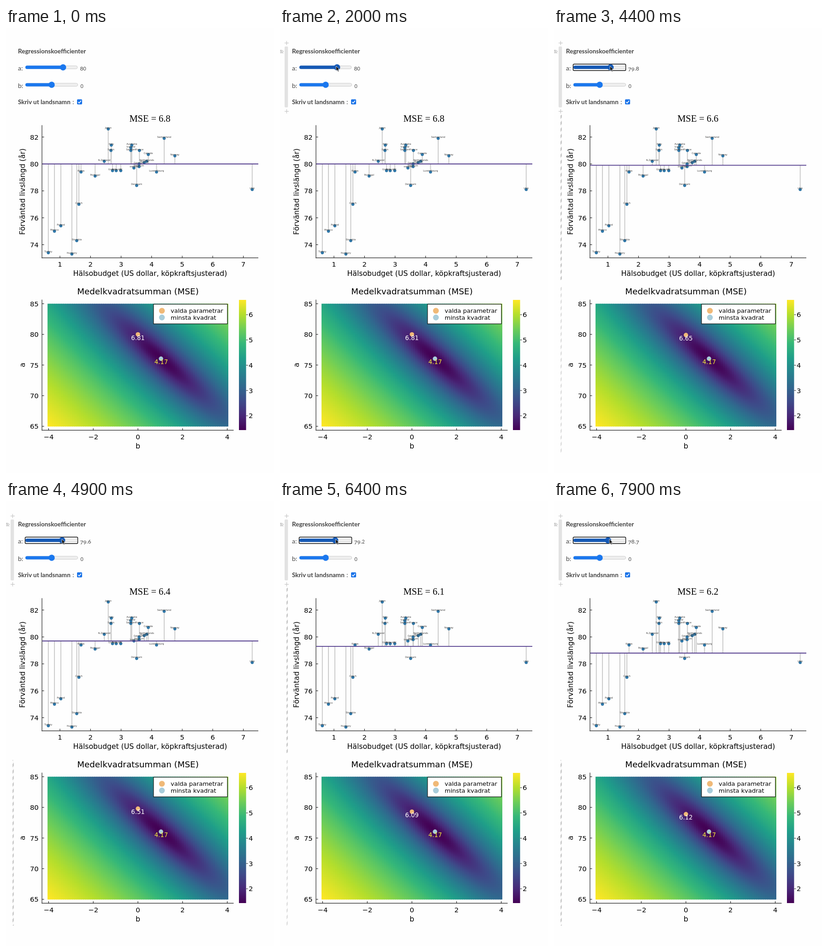
Recreate the animation shown at these times as an HTML page with a canvas. Size 581x964 px, loop 8 s.

```html
<!DOCTYPE html>
<html lang="sv">
<head>
<meta charset="utf-8">
<title>Regressionskoefficienter</title>
<style>
  html, body { margin: 0; width: 100%; height: 100%; overflow: hidden; background: #fefefe; }
  canvas, svg { position: absolute; left: 0; top: 0; width: 581px; height: 964px; }
  svg { font-family: "DejaVu Sans", sans-serif; }
  .ui { font: 14px Lato, sans-serif; fill: #444; }
  .bold { font-weight: 700; font-size: 13.5px; }
  .tex { font: 20.4px "Liberation Serif", serif; }
  .tick { font-size: 14.8px; }
  .axis { font-size: 15.68px; }
  .num { font-size: 13.2px; }
  .name { font-size: 5.2px; fill: #3a3a3a; }
  .stripe {
    position: absolute; left: 13.6px; width: 3.6px;
    background: repeating-linear-gradient(-45deg, #c8c8c8 0 4.95px, #fbfbfb 4.95px 9.9px);
    background-size: 3.6px 14px;
  }
</style>
</head>
<body>
<canvas id="map" width="581" height="964"></canvas>
<svg id="art" viewBox="0 0 581 964"></svg>
<div class="stripe" id="plotRun" style="top:188px;height:358px"></div>
<div class="stripe" id="mapRun" style="top:561px;height:359px"></div>
<script>
const $ = id => document.getElementById(id);
const LOOP = 8000, STEP = 100;

// country, health budget, life expectancy
const data = [
  ['Japan', 2.58, 82.6], ['Switzerland', 4.41, 81.9], ['Italy', 2.68, 81.4],
  ['Spain', 2.67, 81], ['Australia', 3.35, 81.4], ['Iceland', 3.32, 81.2],
  ['Sweden', 3.32, 81], ['France', 3.6, 81], ['Canada', 3.89, 80.7],
  ['Norway', 4.76, 80.6], ['N.Zealand', 2.45, 80.2], ['Netherlands', 3.84, 80.2],
  ['Austria', 3.76, 80.1], ['Germany', 3.59, 80], ['Belgium', 3.59, 79.8],
  ['Ireland', 3.42, 79.7], ['Greece', 2.72, 79.5], ['Finland', 2.84, 79.5],
  ['UK', 2.99, 79.5], ['Luxembourg', 4.16, 79.4], ['Korea', 1.69, 79.4],
  ['Portugal', 2.15, 79.1], ['Denmark', 3.51, 78.4], ['USA', 7.29, 78.1],
  ['Czech', 1.62, 77], ['Poland', 1.03, 75.4], ['Mexico', 0.82, 75],
  ['Slovakia', 1.55, 74.3], ['Turkey', 0.62, 73.4], ['Hungary', 1.39, 73.3]
];
const mse = (a, b = 0) =>
  data.reduce((sum, [, x, y]) => sum + (y - a - b * x) ** 2, 0) / data.length;

// plot coordinates
const px = x => 50.7 + 66.26 * x;
const py = y => 294.5 - 29.15 * (y - 80);
const bx = b => 286 + 48.4 * b;
const ay = a => 663.7 - 13.28 * (a - 80);
const cy = v => 621 - 54.75 * (v - 6);

// svg helpers
function el(tag, attrs, parent = $('art')) {
  const node = document.createElementNS('http://www.w3.org/2000/svg', tag);
  for (const key in attrs) node.setAttribute(key, attrs[key]);
  return parent.appendChild(node);
}
const set = (node, attrs) => { for (const key in attrs) node.setAttribute(key, attrs[key]); };
function text(str, x, y, cls, anchor = 'middle', more = {}, parent) {
  const node = el('text', { x, y, class: cls, 'text-anchor': anchor, ...more }, parent);
  node.textContent = str;
  return node;
}
const line = (x1, y1, x2, y2, stroke = '#222', width = 1.2, parent) =>
  el('line', { x1, y1, x2, y2, stroke, 'stroke-width': width }, parent);
const rect = (x, y, width, height, fill, more = {}, parent) =>
  el('rect', { x, y, width, height, fill, ...more }, parent);
const dot = (cx, cy, r, fill, more = {}) => el('circle', { cx, cy, r, fill, ...more });

// viridis colours
const stops = ['440154', '482878', '3e4a89', '31688e', '26828e', '1f9e89', '35b779', '6dcd59', 'b4de2c', 'fde725']
  .map(hex => [0, 2, 4].map(i => parseInt(hex.substr(i, 2), 16)));
function viridis(u) {
  const p = Math.max(0, Math.min(1, u)) * (stops.length - 1);
  const i = Math.min(stops.length - 2, Math.floor(p));
  return `rgb(${stops[i].map((c, j) => Math.round(c + (stops[i + 1][j] - c) * (p - i)))})`;
}

function paintMap() {
  const g = $('map').getContext('2d');
  const low = 1.43, high = Math.log(mse(65, -4));
  g.save();
  g.beginPath();
  g.rect(90, 597.3, 392, 266);
  g.clip();
  for (let r = 200; r >= 0; r--) {
    for (let c = 0; c <= 80; c++) {
      const a = 65 + r / 10, b = -4 + c / 10;
      g.fillStyle = viridis((Math.log(mse(a, b)) - low) / (high - low));
      g.fillRect(bx(b - 0.05), ay(a + 0.05), 6, 2.4);
    }
  }
  g.restore();
  for (let y = 589; y < 871; y++) {
    g.fillStyle = viridis((871 - y) / 282);
    g.fillRect(505, y, 15.5, 1);
  }
}

function slider(y, width) {
  rect(42.4, y - 3.3, width, 6.6, '#efefef', { rx: 3.3, stroke: '#c4c4c4', 'stroke-width': 0.8 });
  const fill = rect(42, y - 3.6, 57, 7.2, '#1a77ee', { rx: 3.6 });
  const thumb = dot(99, y, 6.7, '#1a77ee');
  return { fill, thumb };
}

// old-style figures: 0-2 are small, most others hang below the line
function figures(node, str) {
  node.textContent = '';
  let shift = 0;
  for (const ch of str) {
    const dy = '34579'.includes(ch) ? 2.4 : 0;
    el('tspan', { dy: dy - shift, 'font-size': '012'.includes(ch) ? 10.6 : 12.2 }, node).textContent = ch;
    shift = dy;
  }
}

paintMap();

// controls
text('Regressionskoefficienter', 26, 55, 'ui bold', 'start');
text('a:', 26, 92, 'ui', 'start');
text('b:', 26, 130, 'ui', 'start');
text('Skriv ut landsnamn', 26, 165, 'ui bold', 'start');
text(':', 144, 165, 'ui', 'start');
const focus = rect(41.5, 78.3, 114, 14, 'none', { rx: 2, stroke: '#111', 'stroke-width': 1.5 });
const sliderA = slider(85.2, 112.4);
slider(123, 113.2);
const valueA = text('', 160.5, 92, 'ui', 'start');
figures(text('', 161.5, 130, 'ui', 'start'), '0');
rect(154, 154.5, 11, 11, '#1a73e8', { rx: 1.8 });
el('path', { d: 'M156.3 160.2l2.3 2.4l4.3-5', fill: 'none', stroke: '#fff', 'stroke-width': 1.6 });

// marks of the hovered cell
const hover = el('g', {});
const bar = rect(10, 40, 7.3, 132, '#e2e2e2', { rx: 2 }, hover);
for (const y of [32.5, 180.5]) {
  line(10, y, 19, y, '#bdbdbd', 1, hover);
  line(14.5, y - 4.5, 14.5, y + 4.5, '#bdbdbd', 1, hover);
}
el('path', {
  d: 'M-3 51Q2.5 44.5 8 51Q2.5 57.5 -3 51M0.6 51a2 2 0 1 0 4 0a2 2 0 1 0 -4 0M-1 46.5L7 55.5',
  fill: 'none', stroke: '#bdbdbd', 'stroke-width': 1
}, hover);

// scatter plot
const title = text('', 312, 203, 'tex');
line(78, 210.5, 78, 498.4);
line(77.4, 497.8, 547, 497.8);
for (let x = 1; x <= 7; x++) {
  line(px(x), 493.5, px(x), 498);
  text(x, px(x), 516.8, 'tick');
}
for (let y = 74; y <= 82; y += 2) {
  line(78, py(y), 82.5, py(y));
  text(y, 70.8, py(y) + 5.4, 'tick', 'end');
}
text('Hälsobudget (US dollar, köpkraftsjusterad)', 312.5, 537, 'axis');
text('Förväntad livslängd (år)', 0, 0, 'axis', 'middle', { transform: 'translate(41 354.5) rotate(-90)' });
const rests = data.map(([, x, y]) => line(px(x), py(y), px(x), py(80), '#cccccc', 2));
data.forEach(([, x, y]) => dot(px(x), py(y), 3, '#2f7bb0', { stroke: '#23658f', 'stroke-width': 0.7 }));
data.forEach(([name, x, y]) => text(name, px(x), py(y) - 0.8, 'name'));
const fit = line(78.5, 294.5, 547, 294.5, '#523b8c', 1.9);

// map of the mean square
text('Medelkvadratsumman (MSE)', 286, 577.3, '', 'middle', { 'font-size': 18.3 });
line(78, 588.5, 78, 872);
line(77.4, 871.4, 493.5, 871.4);
for (let b = -4; b <= 4; b += 2) {
  line(bx(b), 867, bx(b), 871.5);
  text(String(b).replace('-', '\u2212'), bx(b), 890.5, 'tick');
}
for (let a = 65; a <= 85; a += 5) {
  line(78, ay(a), 82.5, ay(a));
  text(a, 70.8, ay(a) + 5.4, 'tick', 'end');
}
text('b', 286, 911, 'axis');
text('a', 0, 0, 'axis', 'middle', { transform: 'translate(41 730) rotate(-90)' });
for (let v = 2; v <= 6; v++) {
  line(520.5, cy(v), 524.5, cy(v), '#222', 1);
  text(v, 526, cy(v) + 5.4, 'tick', 'start');
}
rect(319.8, 598.3, 160.2, 42.6, '#fff', { stroke: '#111', 'stroke-width': 1.2 });
[['valda parametrar', '#f0b978'], ['minsta kvadrat', '#a9cddb']].forEach(([str, fill], i) => {
  dot(338, 612.5 + 14.6 * i, 6.3, fill);
  text(str, 357, 617.2 + 14.6 * i, '', 'start', { 'font-size': 13.05 });
});
const chosen = dot(286, 663.7, 4.8, '#f0b978');
dot(336, 716.4, 4.8, '#a9cddb');
const score = text('', 286, 675.6, 'num', 'middle', { fill: '#fff' });
text('4.17', 336.4, 728.2, 'num', 'middle', { fill: '#f4ea3c' });

const cursor = el('path', {
  d: 'M0 0V10.3L2.4 8.1L4.1 12L6 11.2L4.3 7.4H7.4Z',
  fill: '#111', stroke: '#fff', 'stroke-width': 0.7
});

// times at which the slider moves and each plot starts and ends its work
const moved = [3600, 4200, 4500, 4800, 5200, 5500, 6100, 6300, 6600, 7200, 7400, 7600, 7800];
const started = [3900, 4300, 4600, 5000, 5300, 5700, 6100, 6400, 6700, 7200, 7500, 7700];
const plotted = [4100, 4500, 4900, 5200, 5500, 5800, 6200, 6600, 6800, 7300, 7600, 7900];
const mapped = [4300, 4600, 5000, 5300, 5700, 5900, 6300, 6700, 6900, 7500, 7700];
const path = [
  [500, 92, 3], [600, 95, 20], [700, 99, 40], [800, 102, 55], [900, 104, 66],
  [1000, 106, 73], [1200, 115, 79], [1300, 120, 82.5], [1500, 121.6, 82.5]
];
const count = (times, t) => times.filter(at => at <= t).length;
const ramp = (t, from, to) => Math.max(0, Math.min(1, (t - from) / (to - from)));
const level = k => 80 - k / 10;

function stripes(node, strength, t) {
  node.style.opacity = strength;
  node.style.backgroundPositionY = `${(t / 1000 * 14) % 14}px`;
}

function draw(t) {
  const k = count(moved, t), run = count(started, t);
  const kPlot = count(plotted, t), kMap = count(mapped, t);

  const thumbX = 123.7 - 0.505 * k;
  const blue = t >= 1200 ? '#1559b5' : '#1a77ee';
  set(sliderA.fill, { width: thumbX - 42, fill: blue });
  set(sliderA.thumb, { cx: thumbX, fill: blue });
  set(focus, { visibility: k ? 'visible' : 'hidden' });
  figures(valueA, String(+level(k).toFixed(1)));

  const a = level(kPlot);
  title.textContent = `MSE = ${mse(a).toFixed(1)}`;
  set(fit, { y1: py(a), y2: py(a) });
  rests.forEach(r => set(r, { y2: py(a) }));

  const aMap = level(kMap);
  set(chosen, { cy: ay(aMap) });
  set(score, { y: ay(aMap) + 11.9 });
  score.textContent = mse(aMap).toFixed(2);

  const plotBusy = run > kPlot;
  stripes($('plotRun'), plotBusy ? 1 : 0, t);
  stripes($('mapRun'), plotBusy ? 0.55 : kPlot > kMap ? 0.95 : 0, t);

  set(hover, { opacity: ramp(t, 400, 1000) });
  set(bar, { opacity: 0.7 + 0.3 * ramp(t, 1700, 2000) });
  const spot = path[count(path.map(p => p[0]), t) - 1];
  set(cursor, spot
    ? { visibility: 'visible', transform: `translate(${spot[1] - 0.12 * k} ${spot[2]})` }
    : { visibility: 'hidden' });
}

let last = -1;
function tick() {
  const t = Math.floor(performance.now() % LOOP / STEP) * STEP;
  if (t !== last) draw(last = t);
  requestAnimationFrame(tick);
}
tick();
</script>
</body>
</html>
```
